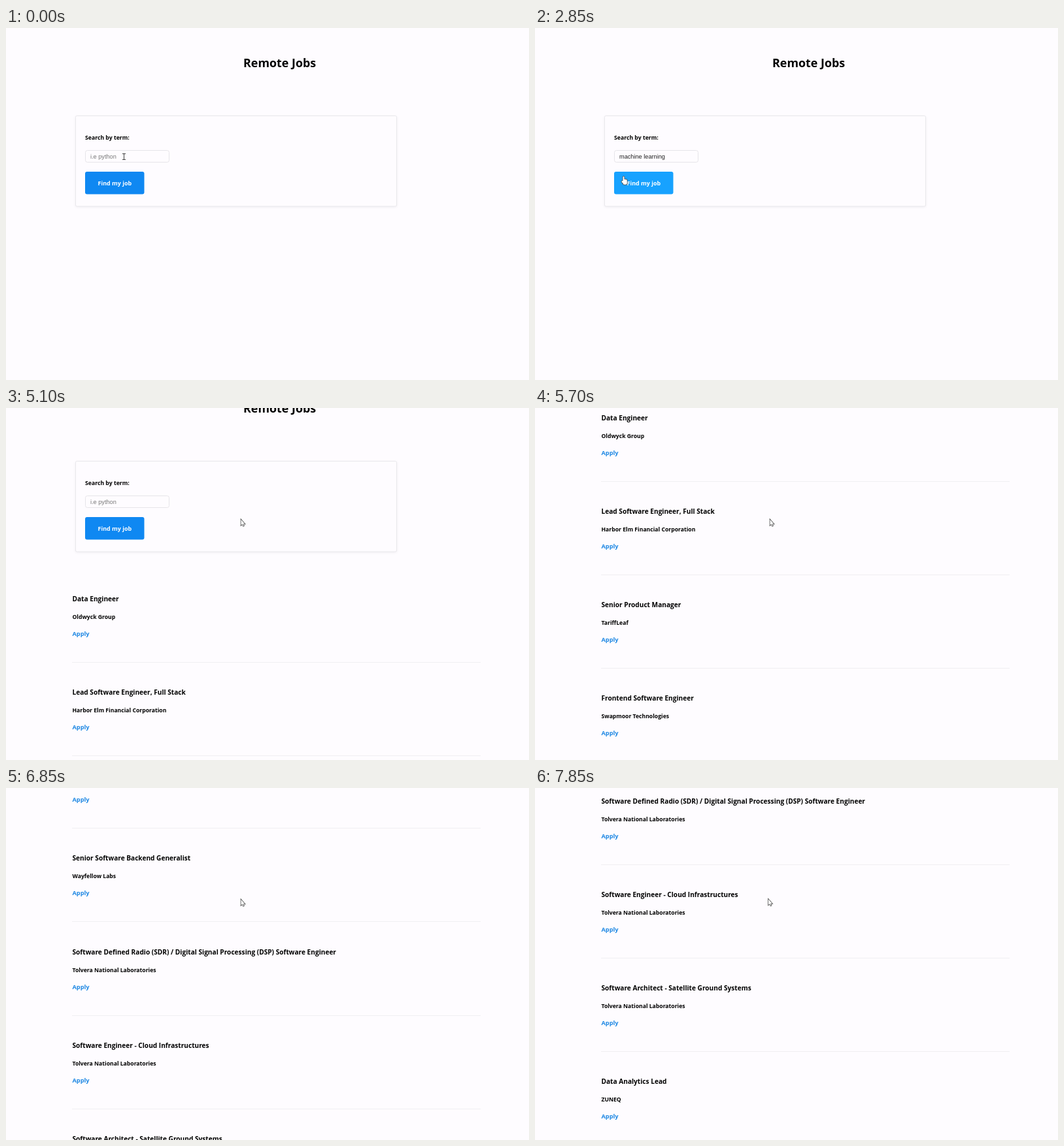
Recreate the animation shown at these times as an HTML page with a canvas. Size 800x539 px, loop 8 s.

```html
<!DOCTYPE html>
<html lang="en">
<head>
<meta charset="utf-8">
<title>Remote Jobs</title>
<style>
  html, body { margin: 0; width: 100%; height: 100%; overflow: hidden; background: #fefcff; }
  canvas { display: block; width: 800px; height: 539px; }
</style>
</head>
<body>
<canvas id="stage" width="800" height="539"></canvas>
<script>
const ctx = document.getElementById('stage').getContext('2d');
const LOOP = 8000, STEP = 50;
const SANS = '"Open Sans", "Noto Sans", sans-serif';
const ARIAL = '"Liberation Sans", Arial, sans-serif';
const PAPER = '#fefcff', INK = '#000', BLUE = '#0f88f2', HOVER_BLUE = '#17a2ff';

const QUERY = 'machine learning';
const TYPING = { start: 750, end: 1050 };
const RESULTS_AT = 4700;
const JOB_TOP = 348.5, JOB_PITCH = 143.2;

const CARD = { x: 106.5, y: 134.5, w: 491, h: 138.5 };
const INPUT = { x: 121.5, y: 187.5, w: 128, h: 18 };
const BUTTON = { x: 121, y: 220, w: 90.5, h: 34.5 };

const JOBS = [
  ['Data Engineer', 'Oldwyck Group'],
  ['Lead Software Engineer, Full Stack', 'Harbor Elm Financial Corporation'],
  ['Senior Product Manager', 'TariffLeaf'],
  ['Frontend Software Engineer', 'Swapmoor Technologies'],
  ['Senior Software Backend Generalist', 'Wayfellow Labs'],
  ['Software Defined Radio (SDR) / Digital Signal Processing (DSP) Software Engineer', 'Tolvera National Laboratories'],
  ['Software Engineer - Cloud Infrastructures', 'Tolvera National Laboratories'],
  ['Software Architect - Satellite Ground Systems', 'Tolvera National Laboratories'],
  ['Data Analytics Lead', 'ZUNEQ']
];

// Each hand movement ends at a place; `sag` bends its path downwards
const HOME = { x: 180, y: 197 };
const MOVES = [
  { start: 0, end: 350, x: 424, y: 211, sag: 14 },
  { start: 500, end: 750, x: 190, y: 197, sag: 0 },
  { start: 2400, end: 2850, x: 135.5, y: 227, sag: 0 },
  { start: 3350, end: 4200, x: 642.5, y: 324, sag: 20 },
  { start: 4500, end: 4550, x: 645.5, y: 334, sag: 0 },
  { start: 4650, end: 5000, x: 359, y: 170, sag: 0 },
  { start: 7200, end: 7300, x: 356.5, y: 169.5, sag: 0 }
];

const WHEEL = [
  { start: 4950, end: 5500, by: 289 },
  { start: 5500, end: 6350, by: 292 },
  { start: 6350, end: 7100, by: 309 },
  { start: 7200, end: 7850, by: 151 }
];

const progress = (t, { start, end }) => Math.min(1, Math.max(0, (t - start) / (end - start)));
const smooth = u => u * u * (3 - 2 * u);
const overshoot = u => 1 + 2.2 * (u - 1) ** 3 + 1.2 * (u - 1) ** 2;
const inside = (r, p) => p.x >= r.x && p.x <= r.x + r.w && p.y >= r.y && p.y <= r.y + r.h;

const scrollAt = t => WHEEL.reduce((sum, g) => sum + g.by * smooth(progress(t, g)), 0);

function pointerAt(t) {
  return MOVES.reduce((from, move) => {
    const u = progress(t, move), e = overshoot(u);
    return {
      x: from.x + (move.x - from.x) * e,
      y: from.y + (move.y - from.y) * e + move.sag * Math.sin(Math.PI * u)
    };
  }, HOME);
}

function label(text, x, y, size, color = INK, font = SANS, weight = 700) {
  ctx.font = `${weight} ${size}px ${font}`;
  ctx.fillStyle = color;
  ctx.fillText(text, x, y);
}

function panel(r, radius, fill, stroke) {
  ctx.beginPath();
  ctx.roundRect(r.x, r.y, r.w, r.h, radius);
  ctx.fillStyle = fill;
  ctx.fill();
  if (!stroke) return;
  ctx.shadowColor = 'transparent';
  ctx.strokeStyle = stroke;
  ctx.lineWidth = 1;
  ctx.stroke();
}

function drawForm(typed, hover) {
  label('Remote Jobs', 363, 59.5, 17.9);

  ctx.save();
  ctx.shadowColor = 'rgba(40, 40, 70, 0.08)';
  ctx.shadowBlur = 4;
  ctx.shadowOffsetY = 1;
  panel(CARD, 2, PAPER, '#e9e8ec');
  ctx.restore();

  label('Search by term:', 121, 171, 8.7);
  panel(INPUT, 3, PAPER, '#e6e5e9');
  label(typed || 'i.e python', 129, 199.5, 9.2, typed ? '#202020' : '#777', ARIAL, 400);
  panel(BUTTON, 3, hover ? HOVER_BLUE : BLUE);
  label('Find my job', 140.5, 241, 8.95, '#fff');
}

function drawJobs(scroll) {
  JOBS.forEach(([title, company], i) => {
    const y = Math.round(JOB_TOP + i * JOB_PITCH - scroll);
    label(title, 101.5, y, 10.15);
    label(company, 101.5, y + 27, 8.65);
    label('Apply', 101.5, y + 53, 9.2, '#1b86e3');
    ctx.fillStyle = '#f0eff2';
    ctx.fillRect(101, y + 93, 625, 1);
  });
}

function outline(path) {
  ctx.strokeStyle = '#444';
  ctx.lineWidth = 1.5;
  ctx.stroke(path);
  ctx.fillStyle = '#fff';
  ctx.fill(path);
}

const arrowPath = new Path2D('M.5 .8V9.6L2.5 7.8L3.9 10.8L5 10.3L3.7 7.4H6.3Z');
const beamPath = new Path2D('M-2-4.5H3M.5-4.5V4.5M-2 4.5H3');
const handPath = new Path2D();
handPath.roundRect(-1, 0.3, 2, 9, 1);
handPath.roundRect(-1, 4.7, 6.3, 8, 2);
handPath.roundRect(-3, 7, 3.5, 3, 1.4);

const CURSORS = {
  arrow: () => outline(arrowPath),
  hand: () => outline(handPath),
  beam() {
    ctx.strokeStyle = '#444';
    ctx.lineWidth = 1;
    ctx.stroke(beamPath);
  }
};

function draw(t) {
  const pointer = pointerAt(t);
  const scroll = scrollAt(t);
  const results = t >= RESULTS_AT;
  const hover = !results && inside(BUTTON, pointer);
  const typed = results ? '' : QUERY.slice(0, Math.ceil(QUERY.length * progress(t, TYPING)));

  ctx.fillStyle = PAPER;
  ctx.fillRect(0, 0, 800, 539);
  ctx.save();
  ctx.translate(0, -Math.round(scroll));
  drawForm(typed, hover);
  ctx.restore();
  if (results) drawJobs(scroll);

  // The pointer stays hidden after typing until it moves again
  if (t > TYPING.start && t <= MOVES[2].start) return;
  const beam = !results && inside(INPUT, pointer);
  ctx.save();
  ctx.translate(pointer.x, pointer.y);
  CURSORS[hover ? 'hand' : beam ? 'beam' : 'arrow']();
  ctx.restore();
}

const start = performance.now();
function tick() {
  const t = (performance.now() - start) % LOOP;
  draw(Math.floor(t / STEP) * STEP);
  requestAnimationFrame(tick);
}
tick();
</script>
</body>
</html>
```
